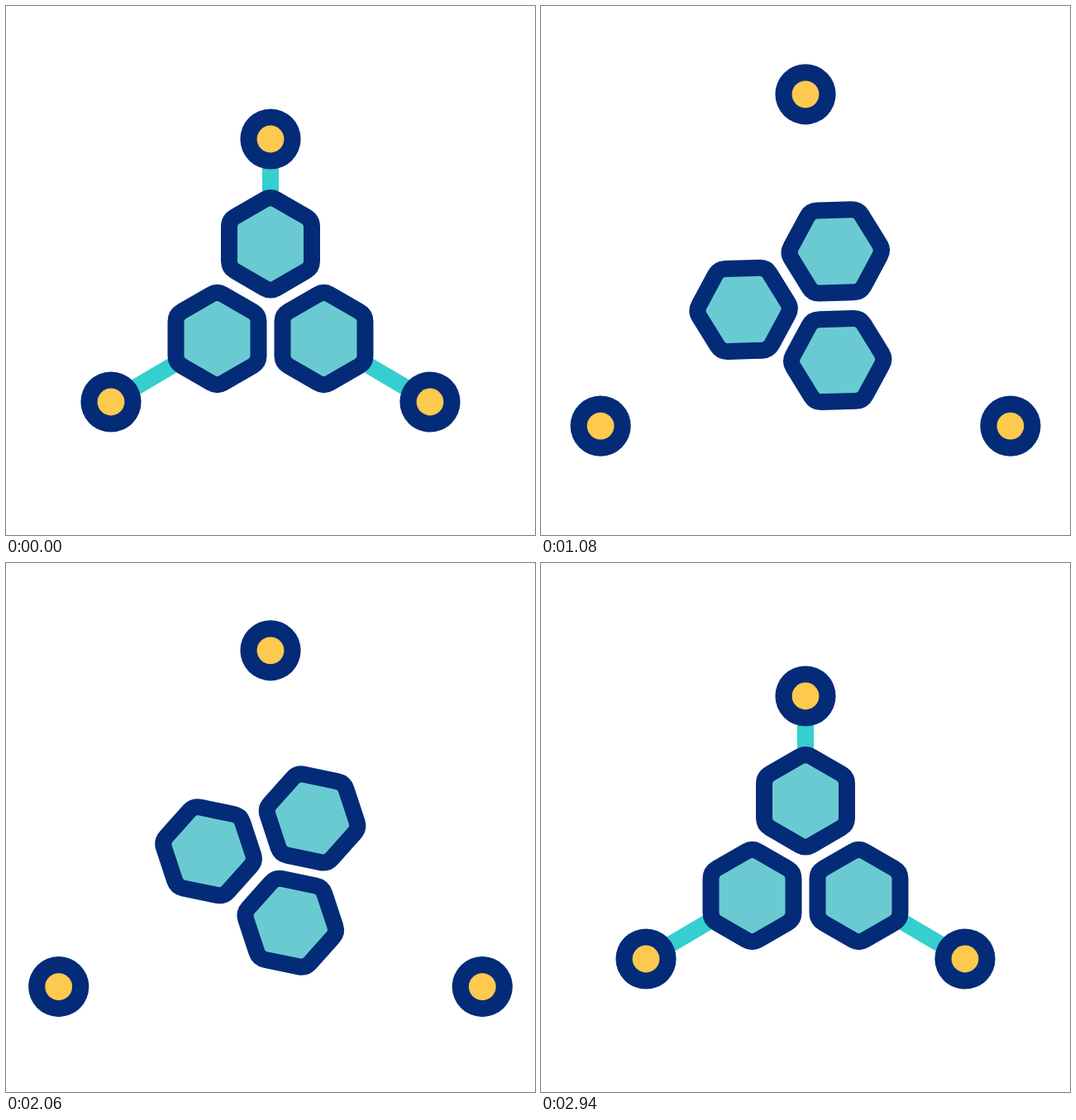
An HTML page for the animation above (3380 ms loop, 640 by 640 pixels).

```html
<!DOCTYPE html>
<html lang="en">
<head>
<meta charset="utf-8">
<title>Rotating molecule</title>
<style>
  html, body { margin: 0; width: 100%; height: 100%; overflow: hidden; background: #fff; }
  svg { display: block; width: 100%; height: 100%; }
</style>
</head>
<body>
<svg id="stage" viewBox="0 0 640 640"></svg>
<script>
const LOOP = 3380, STEP = 20;
const NAVY = '#032b77', TEAL = '#69cbd1', CYAN = '#35cfcf', YELLOW = '#fdc94f';
const stage = document.getElementById('stage');

function add(parent, tag, attrs) {
  const el = document.createElementNS('http://www.w3.org/2000/svg', tag);
  for (const key in attrs) el.setAttribute(key, attrs[key]);
  return parent.appendChild(el);
}

// Cubic ease with flat ends; x1 and x2 are the handle lengths.
function ease(u, x1 = 1 / 3, x2 = 2 / 3) {
  let lo = 0, hi = 1, s = u;
  for (let i = 0; i < 24; i++) {
    s = (lo + hi) / 2;
    const r = 1 - s;
    if (3 * x1 * s * r * r + 3 * x2 * s * s * r + s * s * s < u) lo = s;
    else hi = s;
  }
  return s * s * (3 - 2 * s);
}

// Keys are [time, value, x1, x2]; the handles shape the move into that key.
function track(keys, t) {
  if (t <= keys[0][0]) return keys[0][1];
  for (let i = 1; i < keys.length; i++) {
    const [t0, v0] = keys[i - 1], [t1, v1, x1, x2] = keys[i];
    if (t < t1) return v0 + (v1 - v0) * ease((t - t0) / (t1 - t0), x1, x2);
  }
  return keys[keys.length - 1][1];
}

const spin = [[760, 0], [2620, 360]];
const trim = [[560, 0], [760, 1], [2640, 1], [2860, 0]];
const topPush = [[460, 0], [840, 64, .3, .3], [1170, 52], [1280, 51.5],
                 [1760, 55.2], [2140, 55.2], [2940, 0, .35, .75]];
const sidePush = [[460, 0], [840, 63.5, .3, .3], [1170, 53], [1480, 63],
                  [2140, 63.3], [2940, 0, .35, .75]];

const arms = [
  { node: [320, 161], dir: [0, -1], push: topPush, from: [320, 187.5], to: [320, 234], hex: [320, 287.8] },
  { node: [127, 479], dir: [-1, .53], push: sidePush, from: [149.7, 465.4], to: [208, 431], hex: [255.5, 402.5] },
  { node: [513, 479], dir: [1, .53], push: sidePush, from: [490.3, 465.4], to: [432, 431], hex: [384.5, 402.5] }
];

// The round joins of two wide outlines give the rounded corners.
function addHexagon(parent, [cx, cy]) {
  const radius = 36 / Math.cos(Math.PI / 6);
  const points = Array.from({ length: 6 }, (_, i) => {
    const a = i * Math.PI / 3;
    return [cx + radius * Math.sin(a), cy - radius * Math.cos(a)];
  }).join(' ');
  for (const [color, width] of [[NAVY, 48], [TEAL, 8]])
    add(parent, 'polygon', { points, fill: color, stroke: color, 'stroke-width': width, 'stroke-linejoin': 'round' });
}

for (const arm of arms)
  arm.line = add(stage, 'line', {
    x2: arm.to[0], y2: arm.to[1], stroke: CYAN, 'stroke-width': 20, 'stroke-linecap': 'round'
  });

const cluster = add(stage, 'g', {});
for (const arm of arms) addHexagon(cluster, arm.hex);

for (const arm of arms) {
  arm.dot = add(stage, 'g', {});
  add(arm.dot, 'circle', { r: 36.6, fill: NAVY });
  add(arm.dot, 'circle', { r: 16.4, fill: YELLOW });
}

function draw(t) {
  const cut = track(trim, t);
  cluster.setAttribute('transform', `rotate(${track(spin, t)} 320 364.3)`);
  for (const { node, dir, push, from, to, line, dot } of arms) {
    const d = track(push, t);
    dot.setAttribute('transform', `translate(${node[0] + dir[0] * d} ${node[1] + dir[1] * d})`);
    line.setAttribute('x1', from[0] + (to[0] - from[0]) * cut);
    line.setAttribute('y1', from[1] + (to[1] - from[1]) * cut);
    line.setAttribute('visibility', cut < 1 ? 'visible' : 'hidden');
  }
}

const start = performance.now();
function tick() {
  const t = (performance.now() - start) % LOOP;
  draw(Math.floor(t / STEP) * STEP);
  requestAnimationFrame(tick);
}
draw(0);
requestAnimationFrame(tick);
</script>
</body>
</html>
```
